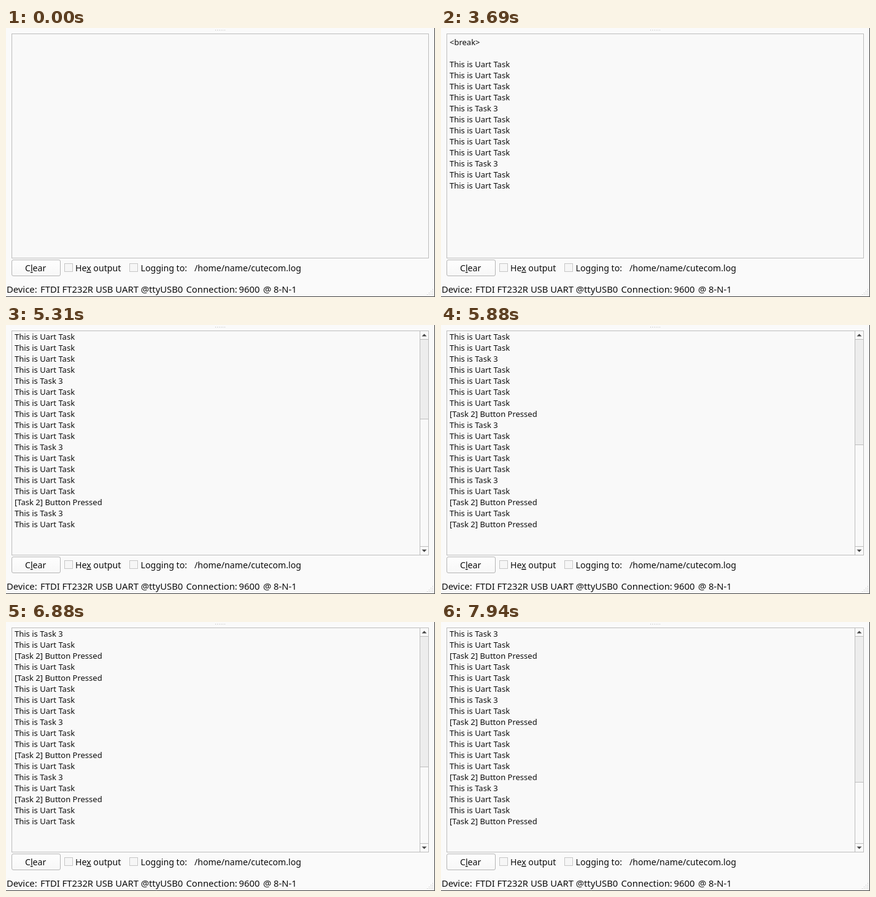
Recreate the animation shown at these times as an HTML page. Size 699 px wide and 439 px high, loop 8 s.

```html
<!DOCTYPE html>
<html lang="en">
<head>
<meta charset="utf-8">
<title>Serial terminal log</title>
<style>
  html, body { margin: 0; width: 100%; height: 100%; overflow: hidden; background: #fafafa; }
  svg { display: block; font-family: "Noto Sans", sans-serif; fill: #0c0c0c; }
  .log { font-size: 13px; }
  .label { font-size: 14.15px; }
  .status { font-size: 14.8px; }
  .key { text-decoration: underline; }
  .box { fill: #f9f9f9; stroke: #bdbdbd; }
  .check { fill: #f6f6f6; stroke: #c6c6c6; }
  .dot { fill: #b8b8b8; }
</style>
</head>
<body>
<svg width="699" height="439" viewBox="0 0 699 439">
  <defs>
    <clipPath id="view"><rect x="10" y="10" width="678" height="365"/></clipPath>
    <linearGradient id="face" x2="0" y2="1">
      <stop stop-color="#fefefe"/><stop offset="1" stop-color="#f7f7f7"/>
    </linearGradient>
  </defs>
  <rect width="699" height="439" fill="#fafafa"/>
  <g id="dots"></g>
  <rect class="box" x="9.5" y="9.5" width="679" height="366"/>
  <g clip-path="url(#view)"><g id="log" class="log"></g></g>

  <g id="bar">
    <rect class="box" x="674.5" y="9.5" width="14" height="366"/>
    <rect id="track" x="674.5" y="23.5" width="14" fill="#ededed" stroke="#bdbdbd"/>
    <path d="M675 361.5h13" stroke="#bdbdbd"/>
    <path d="M677.5 18.5l4 -4 4 4zM677.5 366.5l4 4 4 -4z" fill="#444"/>
  </g>

  <rect x="9.5" y="378.5" width="79" height="26" rx="2.5" fill="url(#face)" stroke="#b4b4b4"/>
  <g class="label">
    <text x="31" y="397">C<tspan class="key">l</tspan>ear</text>
    <rect class="check" x="95.5" y="384.5" width="13" height="13"/>
    <text x="113" y="397">He<tspan class="key">x</tspan> output</text>
    <rect class="check" x="201.5" y="384.5" width="13" height="13"/>
    <text x="219.5" y="397">Logging to:</text>
    <text x="307" y="397">/home/name/cutecom.log</text>
  </g>
  <g class="status">
    <text x="1" y="432">Device:</text>
    <text x="56" y="432">FTDI FT232R USB UART @ttyUSB0</text>
    <text x="293.5" y="432">Connection:</text>
    <text x="379.5" y="432">9600</text>
    <text x="419" y="432">@</text>
    <text x="436" y="432">8-N-1</text>
  </g>
  <path d="M698.5 0V438.5H0" fill="none" stroke="#3a3a3a"/>
</svg>
<script>
const LOOP = 8000, TICK = 62.5, ROW = 18, VIEW = 364;
const SCROLL_TOP = 24, SCROLL_END = 362;
const WORDS = { x: '<break>', _: '', U: 'This is Uart Task', T: 'This is Task 3', B: '[Task 2] Button Pressed' };
const LINES = 'x_UUUUTUUUUTUUUUTUUUUUTUUUUBTUUUUTUBUBUUUTUUBUTUBUUUTUBUUUUBTUUB';

// [tick, lines received]
const ARRIVALS = [[42, 3], [53, 10], [55, 11], [56, 13], [59, 14], [63, 16], [65, 18], [71, 21],
  [73, 23], [75, 24], [79, 26], [81, 27], [85, 31], [96, 40], [98, 41], [104, 46],
  [110, 51], [112, 52], [118, 57], [121, 59], [124, 60], [127, 65]];

const $ = id => document.getElementById(id);
function add(parent, tag, attrs) {
  const el = document.createElementNS('http://www.w3.org/2000/svg', tag);
  for (const k in attrs) el.setAttribute(k, attrs[k]);
  return parent.appendChild(el);
}

const dot = (x, y) => add($('dots'), 'rect', { class: 'dot', x, y, width: 1, height: 1 });
for (let i = 0; i < 6; i++) dot(341 + i * 3, 3);
for (let r = 0; r < 4; r++)
  for (let c = 0; c <= r; c++) dot(695 - c * 3, 426 + r * 3);

const rows = [...LINES].map((c, i) => {
  const row = add($('log'), 'text', { x: 14, y: 28 + i * ROW });
  row.textContent = WORDS[c];
  return row;
});

function received(tick) {
  if (tick < ARRIVALS[0][0]) return 0;
  const i = ARRIVALS.findIndex(p => p[0] > tick);
  if (i < 0) return LINES.length;
  const [t0, n0] = ARRIVALS[i - 1], [t1, n1] = ARRIVALS[i];
  return Math.floor(n0 + (n1 - n0) * (tick - t0) / (t1 - t0) + 1e-6);
}

let shown = -1;
function draw(time) {
  const count = received(Math.floor(time % LOOP / TICK));
  if (count === shown) return;
  shown = count;
  rows.forEach((row, i) => row.style.display = i < count ? '' : 'none');

  // Two empty lines trail the newest message.
  const total = count + 2;
  const offset = Math.max(0, total * ROW + 8 - VIEW);
  $('log').setAttribute('transform', `translate(0 ${-offset})`);
  $('bar').style.display = offset ? '' : 'none';
  const thumb = Math.min(SCROLL_END - SCROLL_TOP, 6579 / (total - 0.33));
  $('track').setAttribute('height', Math.round(SCROLL_END - thumb - SCROLL_TOP));
}

const start = performance.now();
function loop() {
  draw(performance.now() - start);
  requestAnimationFrame(loop);
}
loop();
</script>
</body>
</html>
```
